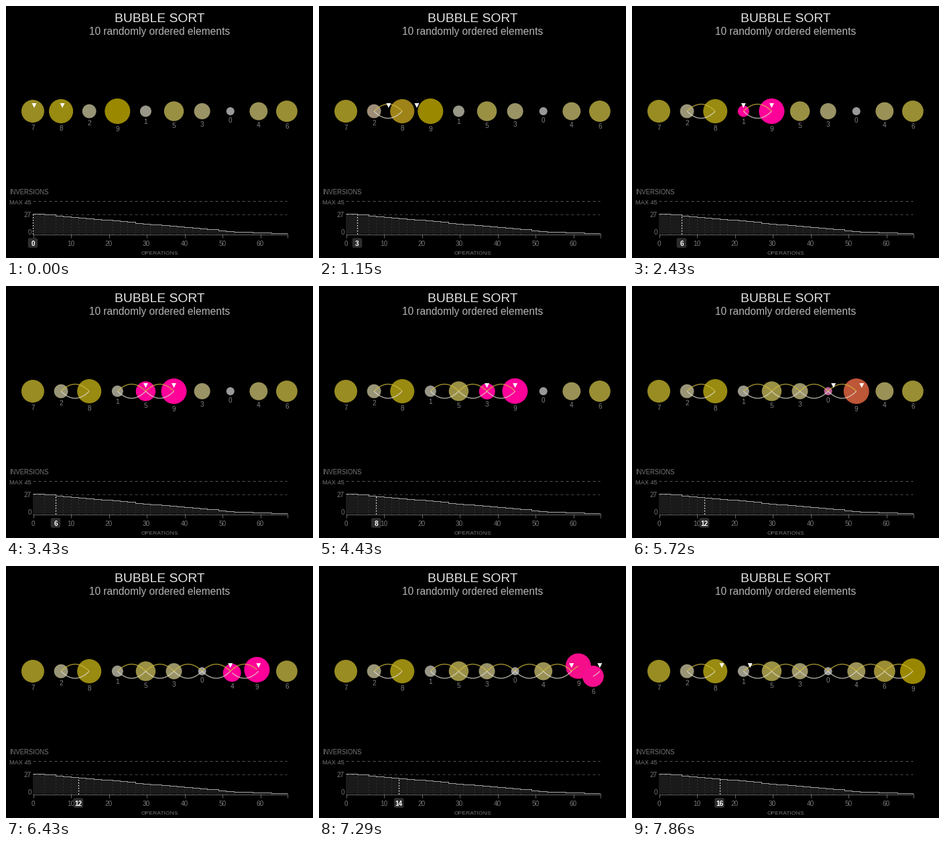
Write a matplotlib script that moves like this. It is 458 by 376 pixels and loops after 8000 ms.

```python
import matplotlib.pyplot as plt
import numpy as np
from matplotlib.animation import FuncAnimation
from matplotlib.patches import Circle, FancyBboxPatch, Polygon

W, H, DPI = 458, 376, 100
PX = 72 / DPI
FRAMES, LOOP = 56, 8000

VALUES = [7, 8, 2, 9, 1, 5, 3, 0, 4, 6]
MID, GAP, ARC = 157, 42.1, 21
PINK = np.array([1, 0, 0.6])
GOLD, SILVER = (0.84, 0.745, 0.24, 0.75), (0.88, 0.86, 0.8, 0.75)

# Start of each arrow move; a swap, if any, ends where the next move starts.
STARTS = [-0.115, 0.89, 1.41, 2.42, 3.45, 4.48, 5.533, 6.54, 7.563]
MOVE, SWAP, FADE_IN, FADE_OUT = 0.5, 0.455, 0.25, 0.33

LEFT, RIGHT, BASE = 40, 419, 340


def slot_x(i):
    return 40 + GAP * i


def radius(v):
    return np.sqrt(36 + 36.1 * v)


def tone(v):
    return np.array([0.6, 0.6 - 0.067 * v / 9, 0.6 - 0.6 * v / 9])


def ease(u):
    u = min(max(u, 0), 1)
    return 4 * u ** 3 if u < 0.5 else 1 - 4 * (1 - u) ** 3


def inversions(a):
    return sum(a[i] > a[j] for i in range(len(a)) for j in range(i + 1, len(a)))


def bubble_sort(values):
    """Return inversions after each operation and the swap operations."""
    a, counts, swaps = list(values), [inversions(values)], []
    for end in range(len(a) - 1, 0, -1):
        for j in range(end):
            if counts[-1] == 0:
                return counts, swaps
            counts.append(counts[-1])
            if a[j] > a[j + 1]:
                a[j], a[j + 1] = a[j + 1], a[j]
                counts.append(counts[-1] - 1)
                swaps.append(len(counts) - 1)
    return counts, swaps


def first_pass(values):
    """Orders before each comparison, swap flags and operation totals."""
    a, orders, swapped, totals, n = list(values), [], [], [], 0
    for j in range(len(a) - 1):
        orders.append(list(a))
        swapped.append(a[j] > a[j + 1])
        if swapped[-1]:
            a[j], a[j + 1] = a[j + 1], a[j]
        n += 1 + swapped[-1]
        totals.append(n)
    orders.append(a)
    return orders, swapped, totals


counts, swap_ops = bubble_sort(VALUES)
orders, swapped, totals = first_pass(VALUES)
LAST = len(counts) - 1


def op_x(n):
    return LEFT + (RIGHT - LEFT) * n / LAST


def inv_y(n):
    return BASE - 1.1 * n


fig = plt.figure(figsize=(W / DPI, H / DPI), dpi=DPI, facecolor="black")
ax = fig.add_axes([0, 0, 1, 1])
ax.set_xlim(0, W)
ax.set_ylim(H, 0)
ax.axis("off")


def text(x, y, s, size, color, ha="center", z=5, **kw):
    return ax.text(x, y, s, fontsize=size * PX, color=color, ha=ha,
                   va="baseline", family="Liberation Sans", zorder=z, **kw)


def line(xs, ys, color, width=1.0, dash=None, z=2, **kw):
    style = (0, tuple(d / width for d in dash)) if dash else "-"
    return ax.plot(xs, ys, color=color, lw=width * PX, ls=style, zorder=z,
                   solid_capstyle="butt", dash_capstyle="butt", **kw)[0]


# Headings
text(229.5, 24, "BUBBLE SORT", 19.3, "#e6e6e6")
text(229.5, 43, "10 randomly ordered elements", 15.56, "#b4b4b4")

# Chart
ops = np.arange(LAST + 1)
ys = inv_y(np.array(counts))
ax.fill_between(op_x(ops), ys, BASE, step="post", color="#1a1a1a", lw=0, zorder=1)
line(op_x(ops), ys, "#a0a0a0", drawstyle="steps-post", z=3)
for n in swap_ops:
    line([op_x(n)] * 2, [BASE, inv_y(counts[n])], "#484848", dash=(1, 4))
for y, color in ((290.5, "#585858"), (310.5, "#484848")):
    line([LEFT, RIGHT], [y, y], color, dash=(4, 4))
line([LEFT, RIGHT], [340.5, 340.5], "#666666")
for x in [op_x(n) for n in range(0, LAST, 10)] + [RIGHT]:
    line([np.floor(x) + 0.5] * 2, [340, 346], "#666666")
for n in range(0, LAST, 10):
    text(op_x(n), 357.5, str(n), 10, "#777777")
text(5, 281, "INVERSIONS", 9.56, "#777777", "left")
text(5, 295.5, "MAX 45", 9.3, "#777777", "left")
text(38, 315, "27", 10, "#777777", "right")
text(38, 341, "0", 10, "#777777", "right")
text(229.5, 371, "OPERATIONS", 8.5, "#777777")

# Chart marker
marker = line([], [], "white", 1.2, dash=(1.5, 2.5), z=6)
badge = FancyBboxPatch((0, 348.5), 10, 10, fc="#2d2d2d", ec="none", zorder=6,
                       boxstyle="round,pad=2.3,rounding_size=2.5")
ax.add_patch(badge)
badge_text = text(0, 357.5, "", 10, "white", z=7, weight="bold")

# Bubbles, trails and arrows
bubbles, names = {}, {}
for k, v in enumerate(VALUES):
    bubbles[v] = ax.add_patch(Circle((0, 0), radius(v), lw=0, zorder=10 + k))
    names[v] = text(0, 0, str(v), 10, "#808080", z=10 + k)
trails = [[line([], [], c, 1.4, z=30) for c in (GOLD, SILVER)] for _ in orders[1:]]
arrows = [ax.add_patch(Polygon(np.zeros((3, 2)), fc="white", lw=0, zorder=40))
          for _ in range(2)]


def arc(slot, p, side):
    """Point at share p of the swap curve: +1 goes right above, -1 left below."""
    x = slot_x(slot + p) if side > 0 else slot_x(slot + 1 - p)
    return x, MID - side * 2 * ARC * p * (1 - p)


def place(v, x, y, heat=0):
    bubbles[v].center = x, y
    bubbles[v].set_facecolor(tone(v) * (1 - heat) + PINK * heat)
    names[v].set_position((x, y + radius(v) + 10.6))


def draw(i):
    t = i * LOOP / FRAMES / 1000
    step = max(k for k, s in enumerate(STARTS) if s <= t)
    start = STARTS[step]
    slot = (step + 1) % len(STARTS)
    order = orders[step + 1]
    for k, v in enumerate(order):
        place(v, slot_x(k), MID)

    # The pair just swapped cools down.
    if swapped[step]:
        heat = 1 - ease((t - start) / FADE_OUT)
        for k in (step, step + 1):
            place(order[k], slot_x(k), MID, heat)

    shares = [float(s and k <= step) for k, s in enumerate(swapped)]
    if slot and swapped[slot]:
        begin = STARTS[slot] - SWAP
        if t > begin:
            p = shares[slot] = ease((t - begin) / SWAP)
            heat = ease((t - begin) / FADE_IN)
            for v, side in ((order[slot], 1), (order[slot + 1], -1)):
                place(v, *arc(slot, p, side), heat)

    for k, (pair, share) in enumerate(zip(trails, shares)):
        for curve, side in zip(pair, (1, -1)):
            curve.set_data(*arc(k, np.linspace(0, share, 24), side))
            curve.set_visible(share > 0)

    at = step + (slot - step) * ease((t - start) / MOVE)
    for k, arrow in enumerate(arrows):
        x = slot_x(at + k)
        arrow.set_xy([(x - 3.5, 145), (x + 3.5, 145), (x, 152)])

    n = totals[step] if i else 0
    x = op_x(n)
    marker.set_data([x, x], [BASE, inv_y(counts[n])])
    badge.set_x(x - 5)
    badge_text.set_x(x)
    badge_text.set_text(str(n))
    return []


anim = FuncAnimation(fig, draw, frames=FRAMES, interval=LOOP / FRAMES,
                     repeat=True, repeat_delay=0, blit=False)
plt.show()
```
